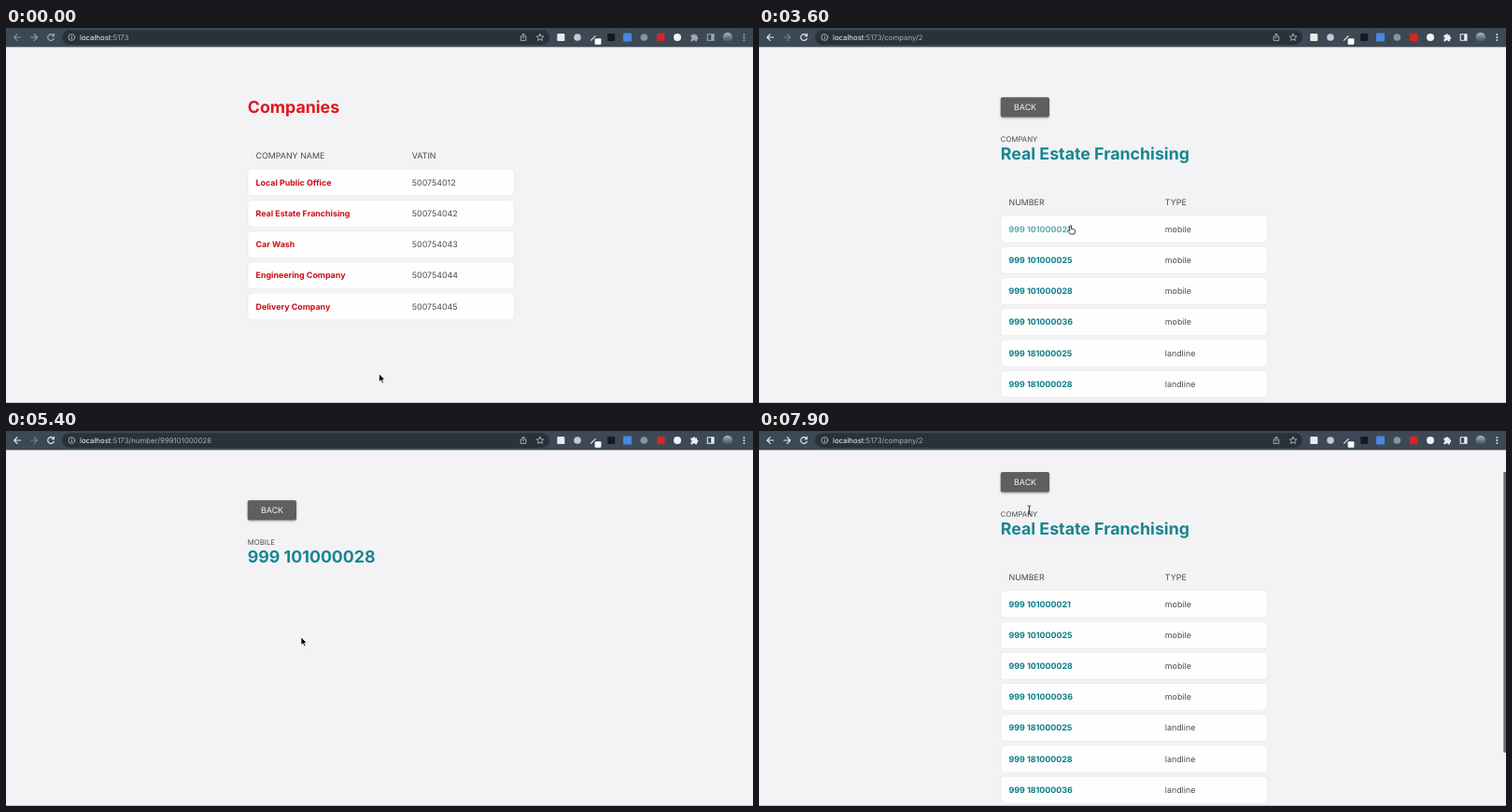
Animation, 800 px wide and 402 px high, one loop 8000 ms. Source, as an HTML page:

```html
<!DOCTYPE html>
<html lang="en">
<head>
<meta charset="utf-8">
<title>Companies</title>
<style>
  html, body { margin: 0; width: 100%; height: 100%; overflow: hidden; background: #f3f3f6; }
  svg { display: block; width: 800px; height: 402px; }
  text { font-family: Inter, "Open Sans", sans-serif; font-size: 8.89px; fill: #4b4b4f; text-rendering: geometricPrecision; }
  .title { font-size: 17.78px; font-weight: 700; }
  .label { font-size: 7.78px; }
  .link { font-weight: 700; }
  .red .title { fill: #e0161e; }
  .red .link { fill: #cb0c14; }
  .teal .title { fill: #18868f; }
  .teal .link { fill: #087c87; }
  .card { fill: #fefefe; stroke: #e7e7ec; stroke-width: .7; }
  .button rect { fill: #5f5f5f; filter: drop-shadow(0 1px 1px #0005); }
  .button text { fill: #f4f4f4; }
  .url { font-size: 7.8px; fill: #a9b0b6; }
  .url .host { fill: #f3f5f6; }
  .icon { fill: none; stroke: #e9edf0; stroke-width: 1.1; stroke-linecap: round; stroke-linejoin: round; }
  .solid { fill: #e9edf0; }
</style>
</head>
<body>
<svg viewBox="0 0 800 402">
  <rect width="800" height="402" fill="#f3f3f6"/>
  <g id="home" class="red"></g>
  <g id="company" class="teal"></g>
  <g id="number" class="teal"></g>
  <rect id="thumb" x="797.3" width="3.4" height="301" rx="1.5" fill="#6c6c6e"/>
  <rect y="401" width="800" height="1" fill="#c6c6c9"/>

  <g id="toolbar">
    <rect width="800" height="20.4" fill="#3c4954"/>
    <rect x="60" y="2.3" width="522" height="15.6" rx="7.8" fill="#27323b"/>
    <path id="back" class="icon" d="M15.5 10H8.7M12 6.7 8.7 10l3.3 3.3"/>
    <path id="forward" class="icon" d="M26.7 10h6.8M30.2 6.7 33.5 10l-3.3 3.3"/>
    <g class="icon chrome">
      <path d="M51 8.2A3.4 3.4 0 1 0 51.3 11.2"/>
      <path d="M51.4 6.4v2.3h-2.3"/>
    </g>
    <g class="icon" stroke-width=".8" opacity=".8">
      <circle cx="70.3" cy="10" r="3.4" style="stroke-width:.8"/>
      <path style="stroke-width:.9" d="M70.3 9.8v1.8M70.3 8.2v.1"/>
      <path style="stroke-width:.8" d="M552.5 9h-1.3v4.4h5.6V9h-1.3M554 11V6.3M552.4 7.7 554 6.2l1.6 1.5"/>
      <path style="stroke-width:.8" d="m572 6.3 1.1 2.4 2.7.3-2 1.8.6 2.6-2.4-1.3-2.4 1.3.6-2.6-2-1.8 2.7-.3z"/>
    </g>
    <text class="url" x="79" y="12.8"><tspan class="host">localhost</tspan><tspan id="path"></tspan></text>
    <rect x="590.3" y="6" width="8" height="8" rx="1" fill="#e8eaec"/>
    <circle cx="612" cy="10" r="3.8" fill="#c3c9cf"/>
    <path class="icon" d="m626.5 13.2 4.6-4.6"/>
    <rect x="630.6" y="11.2" width="6.8" height="6.6" rx="1" fill="#fff"/>
    <rect x="644.2" y="6" width="8" height="8" rx="1" fill="#151a1e"/>
    <rect x="661" y="5.5" width="9" height="9" rx="1" fill="#4a86e0"/>
    <circle cx="683.3" cy="10" r="3.8" fill="#8b949b"/>
    <rect x="697" y="5.7" width="8.6" height="8.6" rx="1" fill="#d3262b"/>
    <circle cx="719" cy="10" r="4" fill="#f3f4f5"/>
    <g class="chrome">
      <path class="solid" d="M733.4 7.6h2a1.3 1.3 0 0 1 2.6 0h2v2a1.3 1.3 0 0 1 0 2.6v2h-2.2a1.1 1.1 0 0 0-2.2 0h-2.2v-2.2a1.1 1.1 0 0 0 0-2.2z"/>
      <rect class="icon" x="751.2" y="6.8" width="6.8" height="6.4"/>
      <rect class="solid" x="755.2" y="6.8" width="2.8" height="6.4"/>
      <g class="solid"><circle cx="790.4" cy="7" r=".9"/><circle cx="790.4" cy="10" r=".9"/><circle cx="790.4" cy="13" r=".9"/></g>
    </g>
    <linearGradient id="sky" x2="0" y2="1"><stop stop-color="#9fb9d0"/><stop offset="1" stop-color="#39424c"/></linearGradient>
    <circle cx="772.8" cy="10" r="5.2" fill="url(#sky)"/>
  </g>

  <g id="pointer">
    <path id="arrow" d="M0 0v8.6l2-1.9 1.4 3.2 1.5-.7-1.4-3h2.8z" fill="#000" stroke="#fff" stroke-width=".7"/>
    <path id="hand" d="M-.9.7Q0-.6.9.7V4l3.2.7q1 .3.9 1.3L4.3 9.6H-.4L-3 6.2q-.4-1.2.8-1l1.3 1z" fill="#fff" stroke="#111" stroke-width=".8" stroke-linejoin="round"/>
    <path id="beam" d="M-1.8-4.6Q0-4.6 0-3.4V3.4Q0 4.6-1.8 4.6M1.8-4.6Q0-4.6 0-3.4M0 3.4Q0 4.6 1.8 4.6M-1 1.4H1" fill="none" stroke="#222" stroke-width=".9"/>
  </g>
</svg>

<script>
const LOOP = 8000, STEP = 100, PITCH = 33.2;
const $ = id => document.getElementById(id);

const text = (x, y, s, cls = '') => `<text x="${x}" y="${y}" class="${cls}">${s}</text>`;
const table = (y, heads, rows) =>
  text(267.5, y, heads[0]) + text(434.8, y, heads[1]) +
  rows.map(([name, info], i) => `<g transform="translate(0 ${y + 11.4 + i * PITCH})">
    <rect class="card" x="259" width="285.4" height="28.9" rx="4"/>
    ${text(267.5, 17.5, name, 'link')}${text(434.8, 17.5, info)}</g>`).join('');
const heading = (label, title) =>
  `<g class="button"><rect x="258.8" y="74.2" width="52.2" height="21.4" rx="2"/>${text(273, 88.1, 'BACK')}</g>` +
  text(258.8, 121.8, label, 'label') + text(258.8, 141.4, title, 'title');

const mobiles = [21, 25, 28, 36].map(n => ['999 1010000' + n, 'mobile']);
const landlines = [25, 28, 36].map(n => ['999 1810000' + n, 'landline']);
const chosen = mobiles[2][0];

$('home').innerHTML = text(258.8, 91.4, 'Companies', 'title') +
  table(139.8, ['COMPANY NAME', 'VATIN'], [
    ['Local Public Office', 500754012], ['Real Estate Franchising', 500754042],
    ['Car Wash', 500754043], ['Engineering Company', 500754044], ['Delivery Company', 500754045]]);
$('company').innerHTML = heading('COMPANY', 'Real Estate Franchising') +
  table(189.8, ['NUMBER', 'TYPE'], [...mobiles, ...landlines]);
$('number').innerHTML = heading('MOBILE', chosen);

// Rows are [time, ...values]; numbers are interpolated, names are held.
const screens = [[0, 'home'], [2900, 'company'], [5300, 'number'], [6900, 'company']];
const shapes = [[0, 'arrow'], [2200, 'hand'], [5300, 'arrow'], [6500, 'hand'], [6900, 'beam']];
const moves = [
  [200, 399.5, 370.8], [500, 388, 334], [800, 362, 256], [1100, 347.5, 217], [1400, 338.6, 199],
  [2000, 338.6, 199], [2400, 329.3, 199], [3000, 329.3, 199], [3400, 333.6, 211.3],
  [4600, 333.6, 211.3], [5100, 316, 221], [5900, 316, 221], [6200, 309, 180],
  [6500, 294, 104], [6800, 289.4, 84.7]];
const scrolls = [[3800, 0], [4000, 15], [4200, 36.6], [4400, 52], [4700, 60.7],
  [7400, 60.7], [7700, 37], [7800, 33], [7900, 30.2]];
const hovers = [
  { link: $('home').querySelectorAll('.link')[1], from: 2200, to: 2900 },
  ...[[3200, 4200], [4200, 4400], [4400, 5300]].map(([from, to], i) =>
    ({ link: $('company').querySelectorAll('.link')[i], from, to }))];

const held = (rows, t) => rows.filter(r => r[0] <= t).pop()[1];
const clamp = v => Math.min(1, Math.max(0, v));
function between(rows, t) {
  const next = rows.findIndex(r => r[0] > t);
  if (next < 1) return (next ? rows[rows.length - 1] : rows[0]).slice(1);
  const a = rows[next - 1], b = rows[next], k = (t - a[0]) / (b[0] - a[0]);
  return a.slice(1).map((v, i) => v + (b[i + 1] - v) * k);
}
const show = (id, on) => $(id).style.display = on ? '' : 'none';

function draw(t) {
  const screen = held(screens, t), shape = held(shapes, t);
  const [scroll] = between(scrolls, t), [x, y] = between(moves, t);
  const active = t >= 2000;

  for (const id of ['home', 'company', 'number']) show(id, id === screen);
  for (const id of ['arrow', 'hand', 'beam']) show(id, id === shape);
  $('pointer').setAttribute('transform', `translate(${x} ${y})`);
  $('company').setAttribute('transform', `translate(0 ${-scroll})`);
  show('thumb', screen === 'company' && t > 3800);
  $('thumb').setAttribute('y', 20 + scroll * .787);

  $('path').textContent = ':5173' + {
    home: '', company: '/company/2', number: '/number/' + chosen.replace(' ', '')
  }[screen];
  $('back').style.opacity = screen === 'home' ? .45 : 1;
  $('forward').style.opacity =
    (screen === 'home' && active) || t >= 6900 ? 1 : screen === 'home' ? .55 : .35;
  document.querySelectorAll('.chrome').forEach(e => e.style.opacity = active ? 1 : .58);

  for (const { link, from, to } of hovers)
    link.style.opacity = 1 - .34 * (clamp((t - from) / 200) - clamp((t - to) / 200));
}

const start = performance.now();
function tick() {
  const t = (performance.now() - start) % LOOP;
  draw(Math.floor(t / STEP) * STEP);
  requestAnimationFrame(tick);
}
tick();
</script>
</body>
</html>
```
